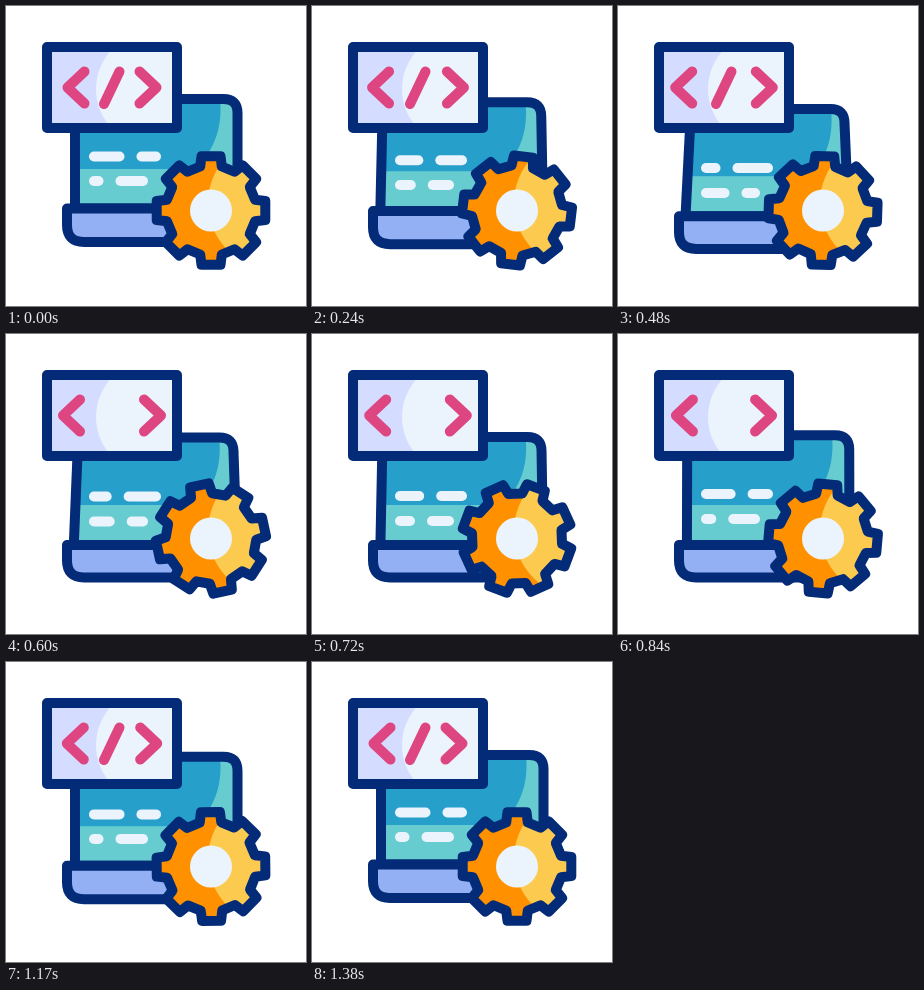
An HTML page with a canvas for the animation above (1.5 s loop, 300 px wide and 300 px high).

```html
<!DOCTYPE html>
<html lang="en">
<head>
<meta charset="utf-8">
<title>Code settings</title>
<style>
html, body { margin: 0; width: 100%; height: 100%; overflow: hidden; background: #fff; }
canvas { display: block; width: 300px; height: 300px; }
</style>
</head>
<body>
<canvas id="stage" width="300" height="300"></canvas>
<script>
const ctx = document.getElementById('stage').getContext('2d');
const LOOP = 1500, STEP = 30, LAST_STEP = 45, LINE = 10;
const NAVY = '#042b77', PALE = '#ebf4fc', PINK = '#de4682',
  TEAL = '#66ccd0', BLUE = '#279fcb', BASE = '#93b0f5',
  LILAC = '#d4dcff', ORANGE = '#ff9100', YELLOW = '#fdca50';

const clamp = x => Math.max(0, Math.min(1, x));
const smooth = x => { x = clamp(x); return x * x * (3 - 2 * x); };
const smoother = x => { x = clamp(x); return x ** 3 * (10 - 15 * x + 6 * x * x); };
// Rises from a to b, then falls from c to d
const bump = (n, a, b, c, d) =>
  n < c ? smooth((n - a) / (b - a)) : smooth((d - n) / (d - c));

function stroke(path, color = NAVY) {
  ctx.strokeStyle = color;
  ctx.lineWidth = LINE;
  ctx.stroke(path);
}

function polyline(points, color) {
  const path = new Path2D();
  for (const [x, y] of points) path.lineTo(x, y);
  stroke(path, color);
}

function disc(x, y, r, color) {
  ctx.fillStyle = color;
  ctx.beginPath();
  ctx.arc(x, y, r, 0, 2 * Math.PI);
  ctx.fill();
}

// Fills a path, paints shading clipped to it, then outlines it
function shape(path, color, shade) {
  ctx.fillStyle = color;
  ctx.fill(path);
  if (shade) {
    ctx.save();
    ctx.clip(path);
    shade();
    ctx.restore();
  }
  stroke(path);
}

// Two dashes separated by a gap that begins at split
function codeRow(y, split, end) {
  polyline([[88, y], [split - 5, y]], PALE);
  polyline([[split + 17, y], [end, y]], PALE);
}

function drawLaptop(tilt, sink, skew) {
  const top = 93 + 10.5 * tilt;
  const foot = 202.5 + 8.5 * sink, bottom = 236 + 7.5 * sink;
  const right = 231.5 - 5 * skew, band = 163 + 8 * sink;
  const screen = new Path2D();
  screen.moveTo(69 - 1.5 * skew, foot);
  screen.lineTo(69 + 4 * skew, top);
  screen.lineTo(right - 14, top);
  screen.quadraticCurveTo(right, top, right, top + 14);
  screen.lineTo(231.5 - skew, foot);
  screen.closePath();
  shape(screen, TEAL, () => {
    const edge = 214 - skew;
    ctx.fillStyle = BLUE;
    ctx.beginPath();
    ctx.moveTo(60, top);
    ctx.lineTo(edge, top);
    ctx.bezierCurveTo(edge + 3, top + 30, 207, top + 53, 189, band);
    ctx.lineTo(60, band);
    ctx.fill();
  });
  codeRow(150.5 + 12 * tilt, 118.5 - 16 * skew, 150);
  codeRow(175 + 12.5 * tilt, 97.5 + 14 * skew, 137);

  const base = new Path2D();
  base.moveTo(61, foot);
  base.lineTo(215, foot);
  base.lineTo(215, bottom);
  base.lineTo(78, bottom);
  base.quadraticCurveTo(61, bottom, 61, bottom - 17);
  base.closePath();
  shape(base, BASE);
}

function drawCard(spread, slash) {
  const card = new Path2D();
  card.rect(41, 41, 130, 81);
  shape(card, LILAC, () => disc(147, 83, 57, PALE));
  const chevron = (tip, arm) =>
    polyline([[arm, 65.5], [tip, 81.5], [arm, 97.5]], PINK);
  chevron(61.5 - spread, 78.5 - spread);
  chevron(150.5 + spread, 133.5 + spread);
  if (slash) polyline([[113.5, 65.5], [98, 98]], PINK);
}

function gearPath(cx, cy, angle) {
  const gear = new Path2D();
  const tooth = [[-10.8, 44], [-9.5, 54.3], [9.5, 54.3], [10.8, 44]];
  for (let i = 0; i < 8; i++) {
    const a = angle + i * Math.PI / 4, cos = Math.cos(a), sin = Math.sin(a);
    for (const [x, y] of tooth) {
      gear.lineTo(cx + x * cos + y * sin, cy + x * sin - y * cos);
    }
  }
  gear.closePath();
  return gear;
}

function drawGear(angle) {
  shape(gearPath(205, 204.5, angle), ORANGE, () => disc(268, 197, 66, YELLOW));
  disc(205, 204.5, 21, PALE);
}

function render(time) {
  const n = Math.max(0, Math.min(LAST_STEP, Math.floor(time % LOOP / STEP) - 1));
  const tilt = bump(n, 1, 17, 20, 44);
  ctx.fillStyle = '#fff';
  ctx.fillRect(0, 0, 300, 300);
  ctx.lineCap = ctx.lineJoin = 'round';
  drawLaptop(tilt, bump(n, 1, 18, 26, 42), bump(n, 0, 15, 15, 29));
  drawCard(4.5 * tilt, n < 19 || n >= 30);
  drawGear(Math.PI * smoother(n / 41));
}

const start = performance.now();
function tick() {
  render(performance.now() - start);
  requestAnimationFrame(tick);
}
tick();
</script>
</body>
</html>
```
